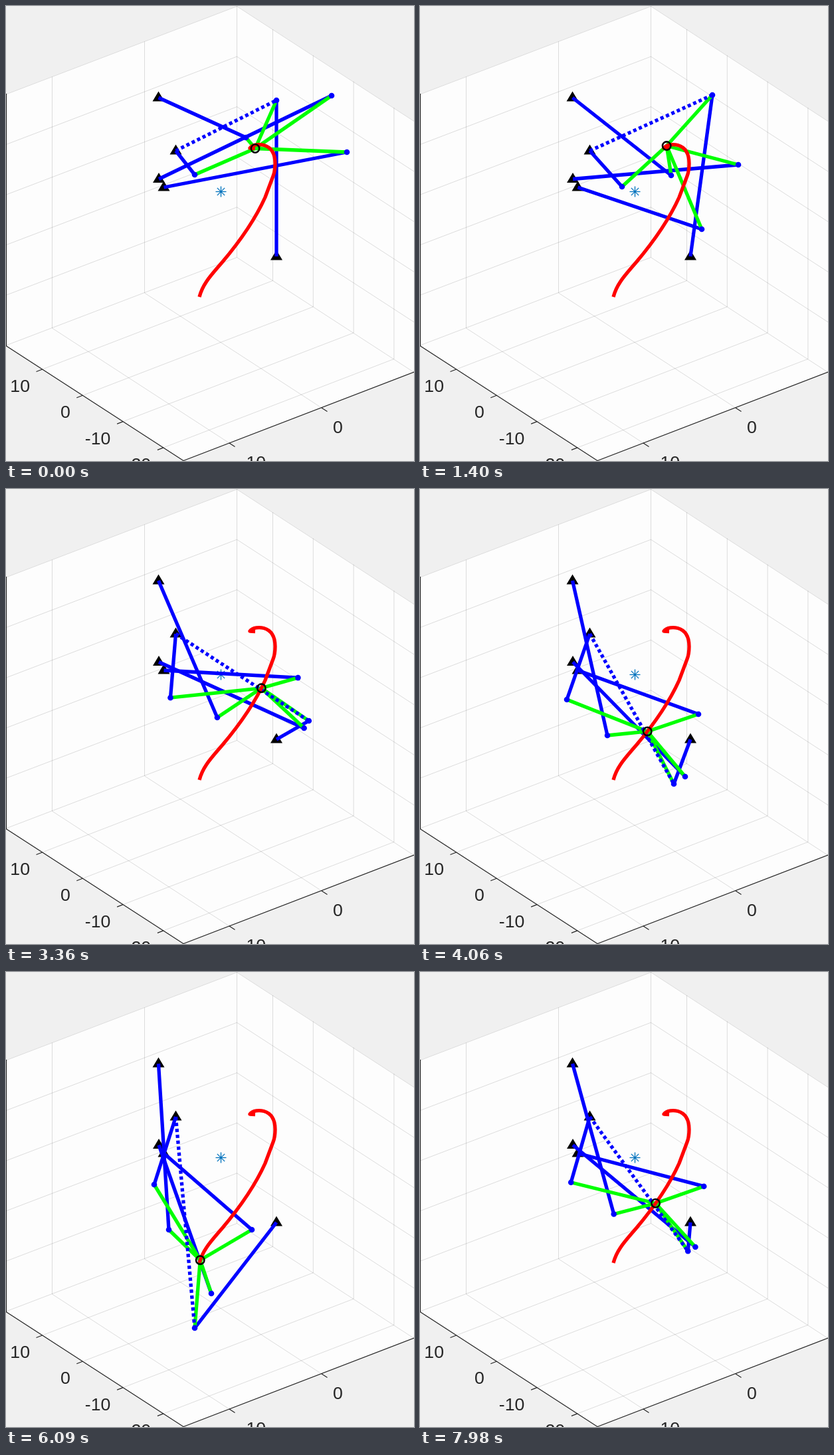
An HTML page with a canvas that plays this animation: 614x685 px, repeating every 8 s.

```html
<!DOCTYPE html>
<html lang="en">
<head>
<meta charset="utf-8">
<title>Linkage in 3D axes</title>
<style>
html, body { margin: 0; width: 100%; height: 100%; overflow: hidden; background: #f0f0f0; }
canvas { display: block; }
</style>
</head>
<body>
<canvas id="stage" width="614" height="685"></canvas>
<script>
const ctx = document.getElementById('stage').getContext('2d');
const STEP = 70, LOOP = 8000, WIDTH = 5.3;
const BLUE = '#0000ff', GREEN = '#00ff00', RED = '#ff0000', INK = '#262626';

// The tool rides along this curve
const TRACE = 'M375 214.5 L367 214 C371 208 382 208 388 209.5 ' +
  'C400 213 405 223 405 237 C405 246 404 251 402 256 L390 288 ' +
  'C376 319 353 353 326 385 C309 405 296 418 291 438';
const rail = document.createElementNS('http://www.w3.org/2000/svg', 'path');
rail.setAttribute('d', TRACE);
const tracePath = new Path2D(TRACE);

// Steps at which the key poses are reached, and the tool's distance along the curve there
const KEYS = [0, 20, 36, 46, 57, 73, 81];
const TRAVEL = [0, 13.5, 36.5, 124, 210, 275, 295.5];

const arm = (base, ...joint) => ({ base, x: joint.map(p => p[0]), y: joint.map(p => p[1]) });
const ARMS = [
  arm([229.5, 138], [361, 198], [378, 255], [368, 286], [322, 340], [282, 371], [246, 388], [245, 388]),
  arm([255.5, 218], [284, 254], [304, 272], [295, 291], [251, 313], [221, 317], [213, 317], [223, 320]),
  arm([230, 260.5], [490, 135], [479, 239], [467, 267], [452, 352], [399, 433], [324, 483], [309, 484]),
  arm([237.5, 273], [513, 220], [424, 336], [384, 303], [438, 282], [419, 339], [371, 385], [370, 388]),
  arm([407, 377], [407, 142], [440, 134], [485, 167], [461, 336], [382, 444], [311, 516], [284, 536])
];

const LAST = KEYS.length - 1;

function slope(v, i) {
  const chord = j => (v[j + 1] - v[j]) / (KEYS[j + 1] - KEYS[j]);
  if (i === 0) return chord(0);
  if (i === LAST) return chord(LAST - 1);
  const a = KEYS[i] - KEYS[i - 1], b = KEYS[i + 1] - KEYS[i];
  return (chord(i - 1) * b + chord(i) * a) / (a + b);
}

// Smooth cubic through the key values, straight on after the last
function sample(v, s) {
  if (s >= KEYS[LAST]) return v[LAST] + slope(v, LAST) * (s - KEYS[LAST]);
  const i = KEYS.findIndex(k => k > s) - 1;
  const h = KEYS[i + 1] - KEYS[i], u = (s - KEYS[i]) / h, w = 1 - u;
  return w * w * (1 + 2 * u) * v[i] + u * u * (3 - 2 * u) * v[i + 1] +
    h * u * w * (w * slope(v, i) - u * slope(v, i + 1));
}

// Out along the path with one held step, then back again
function pathStep(time) {
  const n = Math.floor(time / STEP);
  if (n < 40) return n;
  return n < 85 ? n - 1 : 168 - n;
}

function line(a, b, color, width) {
  ctx.strokeStyle = color;
  ctx.lineWidth = width;
  ctx.beginPath();
  ctx.moveTo(a[0], a[1]);
  ctx.lineTo(b[0], b[1]);
  ctx.stroke();
}

function shape(points, color) {
  ctx.fillStyle = color;
  ctx.beginPath();
  points.forEach(p => ctx.lineTo(p[0], p[1]));
  ctx.fill();
}

function drawAxes() {
  const grid = (x1, y1, x2, y2) => line([x1, y1], [x2, y2], 'rgba(38,38,38,0.15)', 1);
  const edge = (x1, y1, x2, y2) => line([x1, y1], [x2, y2], INK, 1.2);
  ctx.fillStyle = '#f0f0f0';
  ctx.fillRect(0, 0, 614, 685);
  shape([[0, 132.5], [347.5, 0], [614, 173], [614, 551], [267, 684.5], [0, 511.5]], '#fdfdfd');

  for (let i = 0; i < 6; i++) {
    const y = 0.5 + 75.6 * i;
    grid(0, y + 132.5, 347.5, y);
    grid(347.5, y, 614, y + 173);
  }
  grid(347.5, 0, 347.5, 378.5);
  for (let i = 0; i < 2; i++) {
    const x = 69.5 + 139 * i, y = 106.5 - 53 * i;
    grid(x, y, x, y + 378.5);
    grid(x, y + 378.5, x + 266.5, y + 551.5);
    edge(x + 266.5, y + 551.5, x + 275, y + 557);
  }
  for (let i = 0; i < 4; i++) {
    const x = 401.5 + 60.8 * i, y = 35 + 39.3 * i;
    grid(x, y, x, y + 378.5);
    grid(x, y + 378.5, x - 347, y + 512);
    edge(x - 347, y + 512, x - 356, y + 515.5);
  }
  edge(0.5, 132, 0.5, 512);
  edge(0, 511.5, 267, 684.5);
  edge(267, 684.5, 614, 551);

  ctx.fillStyle = INK;
  ctx.font = '26.67px "Liberation Sans", Arial, sans-serif';
  ctx.textAlign = 'right';
  for (let i = 0; i < 4; i++) ctx.fillText(10 - 10 * i, 36 + 60.7 * i, 581 + 39.4 * i);
  ctx.textAlign = 'left';
  ctx.fillText('0', 492, 643);
  ctx.fillText('10', 361.5, 696);
}

function drawStar(x, y, r) {
  for (let i = 0; i < 4; i++) {
    const c = r * Math.cos(i * Math.PI / 4), s = r * Math.sin(i * Math.PI / 4);
    line([x - c, y - s], [x + c, y + s], '#0072bd', 1.3);
  }
}

function draw(time) {
  const s = pathStep(time);
  const { x, y } = rail.getPointAtLength(sample(TRAVEL, s));
  const joints = ARMS.map(a => [sample(a.x, s), sample(a.y, s)]);
  drawAxes();
  drawStar(323.5, 279.5, 8);
  for (const { base: [bx, by] } of ARMS) {
    shape([[bx, by - 9.5], [bx + 9, by + 5.5], [bx - 9, by + 5.5]], '#000');
  }
  ARMS.forEach((a, i) => line(a.base, joints[i], BLUE, WIDTH));
  joints.forEach(j => line([x, y], j, GREEN, WIDTH));
  ctx.fillStyle = BLUE;
  for (const j of joints) {
    ctx.beginPath();
    ctx.arc(j[0], j[1], 4.3, 0, 7);
    ctx.fill();
  }
  ctx.setLineDash([5, 4]);
  line(ARMS[1].base, joints[4], BLUE, WIDTH);
  ctx.setLineDash([]);

  ctx.strokeStyle = RED;
  ctx.lineWidth = WIDTH;
  ctx.lineJoin = 'round';
  ctx.stroke(tracePath);
  ctx.strokeStyle = '#000';
  ctx.lineWidth = 2.6;
  ctx.beginPath();
  ctx.arc(x, y, 6.2, 0, 7);
  ctx.stroke();
}

const start = performance.now();
function tick() {
  draw((performance.now() - start) % LOOP);
  requestAnimationFrame(tick);
}
tick();
</script>
</body>
</html>
```
